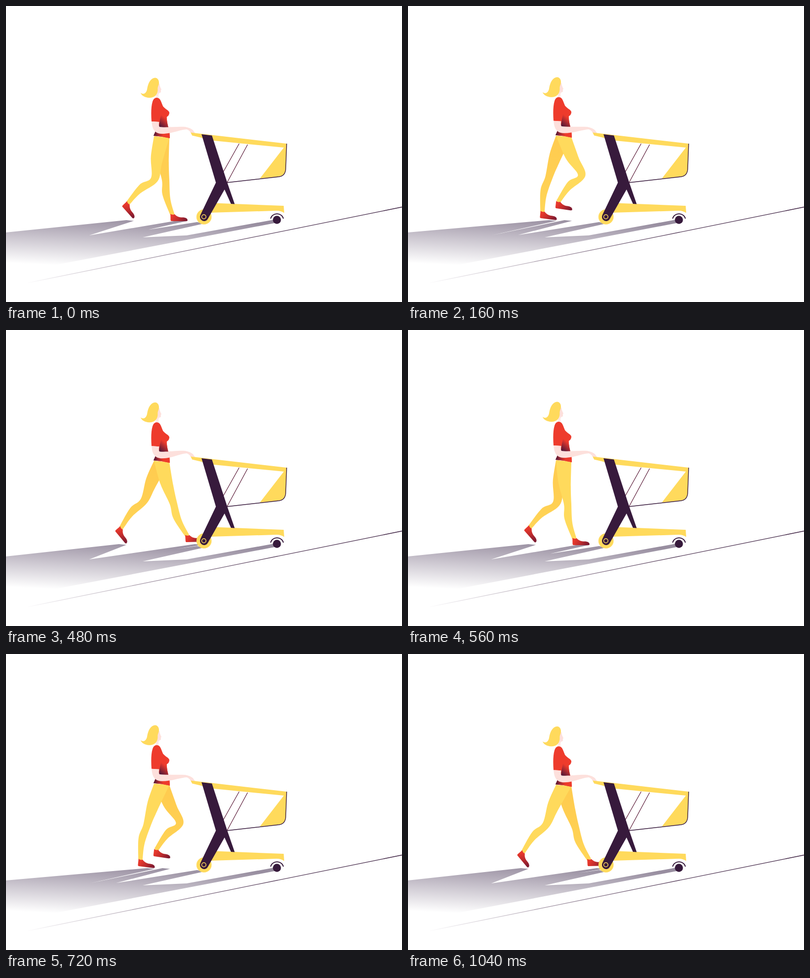
Animation of 800x600 px, one loop 1.12 s. Source, as an HTML page:

```html
<!DOCTYPE html>
<html lang="en">
<head>
<meta charset="utf-8">
<title>Walking with a cart</title>
<style>
  html, body { margin: 0; width: 100%; height: 100%; overflow: hidden; background: #fff; }
  svg { display: block; width: 800px; height: 600px; }
</style>
</head>
<body>
<svg viewBox="0 0 800 600">
  <defs>
    <linearGradient id="shade" gradientUnits="userSpaceOnUse" x1="300" y1="432" x2="295" y2="535">
      <stop offset="0" stop-color="#988ea0"/>
      <stop offset=".5" stop-color="#cdc8d1"/>
      <stop offset="1" stop-color="#fff"/>
    </linearGradient>
    <linearGradient id="ground" gradientUnits="userSpaceOnUse" x1="40" y1="562" x2="800" y2="408">
      <stop offset="0" stop-color="#371a3c" stop-opacity="0"/>
      <stop offset=".6" stop-color="#371a3c" stop-opacity=".8"/>
      <stop offset="1" stop-color="#371a3c"/>
    </linearGradient>
    <linearGradient id="farCloth" gradientUnits="userSpaceOnUse" x1="0" y1="265" x2="0" y2="425">
      <stop offset="0" stop-color="#ffcb4f"/>
      <stop offset=".5" stop-color="#ffcf52"/>
      <stop offset="1" stop-color="#ffd759"/>
    </linearGradient>
    <linearGradient id="leather" gradientUnits="userSpaceOnUse" x1="2" y1="0" x2="26" y2="14">
      <stop offset="0" stop-color="#e7382c"/>
      <stop offset=".45" stop-color="#c02c2d"/>
      <stop offset="1" stop-color="#7d1a30"/>
    </linearGradient>
    <linearGradient id="fold" gradientUnits="userSpaceOnUse" x1="309" y1="242" x2="322" y2="226">
      <stop offset="0" stop-color="#4d1838"/>
      <stop offset=".4" stop-color="#8e2433"/>
      <stop offset="1" stop-color="#ee3b2c"/>
    </linearGradient>
    <linearGradient id="hem" gradientUnits="userSpaceOnUse" x1="299" y1="0" x2="318" y2="0">
      <stop offset="0" stop-color="#4d1838"/>
      <stop offset=".4" stop-color="#9c2733"/>
      <stop offset="1" stop-color="#ee3b2c"/>
    </linearGradient>
    <linearGradient id="neck" gradientUnits="userSpaceOnUse" x1="0" y1="172" x2="0" y2="188">
      <stop offset="0" stop-color="#fde0dc"/>
      <stop offset="1" stop-color="#fdf0ee"/>
    </linearGradient>
    <path id="shoe" fill="url(#leather)" d="M-4 -1.5 Q0 1 4.5 -1 C9 4 14 5.5 20 5.5 C27 5.5 31 8 30.5 12 Q30 13.2 27 13.2 L-2 13 Q-4 13 -3.8 9 Z"/>
  </defs>

  <path d="M40 562 L800 407.500" stroke="url(#ground)" stroke-width="1.3"/>
  <path id="shadow" fill="url(#shade)"/>

  <g id="far"><path fill="url(#farCloth)"/><use href="#shoe"/></g>
  <g id="near"><path fill="#ffda5c"/><use href="#shoe"/></g>

  <g id="body">
    <path fill="url(#neck)" d="M306 152 L310 157 C311 162 312 165 314 168 L312.800 170 L313 174 C311 175 308.500 175 308 179 L309 188 L302 188 L303 176 Z"/>
    <path fill="#ffda5c" d="M301 144.500 C306 144.500 309 149 309 154 C309 160 306 162 306.500 168 C307 178 300 185.500 289 185 C281 184.500 274 181 272 175 C277 179 283 177 285 168 C287 155 292 145.500 301 144.500 Z"/>
    <path fill="#ee3b2c" d="M303 185 C308 184.500 311 187 313 192 L317 202 C321 208 329 210 330 215 C330 221 326 223 324.500 224 C325 234 327 242 330 252 L331 267 Q314 263 298 262 L302 253 L309 234 L294 233 C293 218 293 203 296 193 Q298 186 303 185 Z"/>
    <path fill="url(#fold)" d="M316 202 C315 215 310 228 309 246 L328 246 Q325 235 324.500 224 Q328 222 324 213 Z"/>
    <path fill="url(#hem)" d="M302 253 L298 262 Q314 263 331 267 L330 250 Z"/>
  </g>
  <path id="arm" fill="#fde0dc"/>

  <g fill="#ffda5c">
    <path d="M373 256.500 L567 279 V287.500 L420 273 L376 262.500 Z"/>
    <path d="M562 286 L513 349.500 L552 345.500 Q564 343 565 332 L567 283 Z"/>
    <path d="M422 399.500 L561 405 L562 419.500 Q555 414.500 546 415 L412 419 Z"/>
    <circle cx="400" cy="427.500" r="15.300"/>
  </g>
  <g fill="none" stroke="#371a3c" stroke-width="1.400">
    <path d="M567 279 L565 331 Q564 344 552 346 L446 358"/>
    <path stroke="#5b1b38" stroke-width="1.200" d="M471 279 L438 338 M488 281 L446 359"/>
    <path stroke-width="1.800" d="M534.500 431 C538 418 557 418 560.500 431"/>
  </g>
  <g fill="#371a3c">
    <path d="M395 260 L416 262.500 L447 358 L462 401.500 L454.500 401 L441.500 372 L408 431 A8.500 8.500 0 0 1 392.500 424 L424 358 Z"/>
    <circle cx="547.300" cy="433.500" r="8.200"/>
    <circle cx="399.700" cy="427.300" r="4.300" stroke="#ffda5c" stroke-width="1.500"/>
  </g>
</svg>
<script>
const LOOP = 1120, STEP = 80, RAD = Math.PI / 180;
const THIGH = 87, SHIN = 72;
const $ = id => document.getElementById(id);

// Key poses of one leg: time, then thigh, shin and shoe angles in degrees.
const stride = [
  [0, -9.5, -48, 48],      // push off
  [160, 25, -41.5, 8],     // swing
  [320, 30.5, -4, -22],    // reach
  [480, 16, 23, -2],       // heel down
  [560, 5.6, 11, 0],       // carry
  [720, -19.5, -10.7, 7],
  [880, -25, -19, 33],     // heel up
  [1040, -24, -40, 50]
];

// Smooth periodic interpolation between the key poses.
function pose(time) {
  const t = time % LOOP, n = stride.length;
  const key = i => stride[(i + n) % n];
  const at = i => key(i)[0] + Math.floor(i / n) * LOOP;
  let i = n - 1;
  while (at(i) > t) i--;
  const span = at(i + 1) - at(i), u = (t - at(i)) / span;
  const slope = (j, k) => (key(j + 1)[k] - key(j - 1)[k]) / (at(j + 1) - at(j - 1)) * span;
  return [1, 2, 3].map(k => {
    const a = key(i)[k], b = key(i + 1)[k], m0 = slope(i, k), m1 = slope(i + 1, k);
    return a + u * (m0 + u * (3 * (b - a) - 2 * m0 - m1 + u * (2 * (a - b) + m0 + m1)));
  });
}

// Point at a distance along a limb and to its front side; zero degrees hangs down.
function along([x, y], angle, length, side = 0) {
  const s = Math.sin(angle * RAD), c = Math.cos(angle * RAD);
  return [x + length * s + side * c, y + length * c - side * s];
}

// Smooth cubic segments through a list of points.
function curve(p) {
  let d = '';
  for (let i = 0; i < p.length - 1; i++) {
    const a = p[Math.max(i - 1, 0)], b = p[i], c = p[i + 1], e = p[Math.min(i + 2, p.length - 1)];
    d += `C${[0, 1].map(k => b[k] + (c[k] - a[k]) / 6)} ${[0, 1].map(k => c[k] - (e[k] - b[k]) / 6)} ${c}`;
  }
  return d;
}

// Draws a leg and returns the tip of its shoe.
function drawLeg(id, time, bob) {
  const [thigh, shin, foot] = pose(time);
  const hip = [314, 264.8 + bob];
  const knee = along(hip, thigh, THIGH), ankle = along(knee, shin, SHIN);
  const bend = (thigh + shin) / 2;
  const back = [
    [299, 263 + bob], along(hip, thigh, THIGH * .5, -14.3), along(knee, bend, 0, -7.5),
    along(knee, shin, SHIN * .4, -12), along(ankle, shin, 0, -4.3)
  ];
  const front = [
    along(ankle, shin, 0, 4.3), along(knee, shin, SHIN * .55, 2), along(knee, bend, 0, 7.5),
    along(hip, thigh, THIGH * .6, 9.8), [330, 266 + bob]
  ];
  const [cloth, shoe] = $(id).children;
  cloth.setAttribute('d', `M${back[0]}${curve(back)}L${front[0]}${curve(front)}Z`);
  shoe.setAttribute('transform', `translate(${ankle}) rotate(${foot})`);
  return along(ankle, -foot, 11, 30);
}

// Each shoe casts a spike; the gap between spikes slides with the front one.
function drawShadow(toes) {
  const [rear, front] = toes.map(p => p[0]).sort((a, b) => a - b);
  const spike = x => [[x - 15, 434], [x, 435.5]];
  const slit = 1.86 * front - 394;
  const outline = [[0, 459], ...spike(rear), [168, 465], ...spike(front),
    [slit, 465 - .165 * (slit - 218)], [386, 438], [400, 441],
    [276, 469], [365, 465], [542, 433], [548, 439], [0, 544]];
  $('shadow').setAttribute('d', `M${outline.join('L')}Z`);
}

// The shoulder follows the body while the hand stays on the handle.
function drawArm(b) {
  $('arm').setAttribute('d', `M294.300 ${233 + b} L309.500 ${234 + b} Q308 ${242 + b} 310 ${244 + b}
    C322 ${246 + b} 345 244 362 245 Q373 247 378 252 L382 258 L373 257 Q371 252 365 250
    C350 251 335 ${258 + b} 315 ${258 + b} C301 ${258 + b} 295 ${249 + b} 294.300 ${233 + b}Z`);
}

function draw(now) {
  const t = Math.floor(now % LOOP / STEP) * STEP;
  const bob = 1.2 - 1.5 * Math.cos(2 * Math.PI * (t - 130) / (LOOP / 2));
  drawShadow([drawLeg('near', t, bob), drawLeg('far', t + LOOP / 2, bob)]);
  drawArm(bob);
  $('body').setAttribute('transform', `translate(0 ${bob})`);
}

const start = performance.now();
function tick() {
  draw(performance.now() - start);
  requestAnimationFrame(tick);
}
tick();
</script>
</body>
</html>
```
